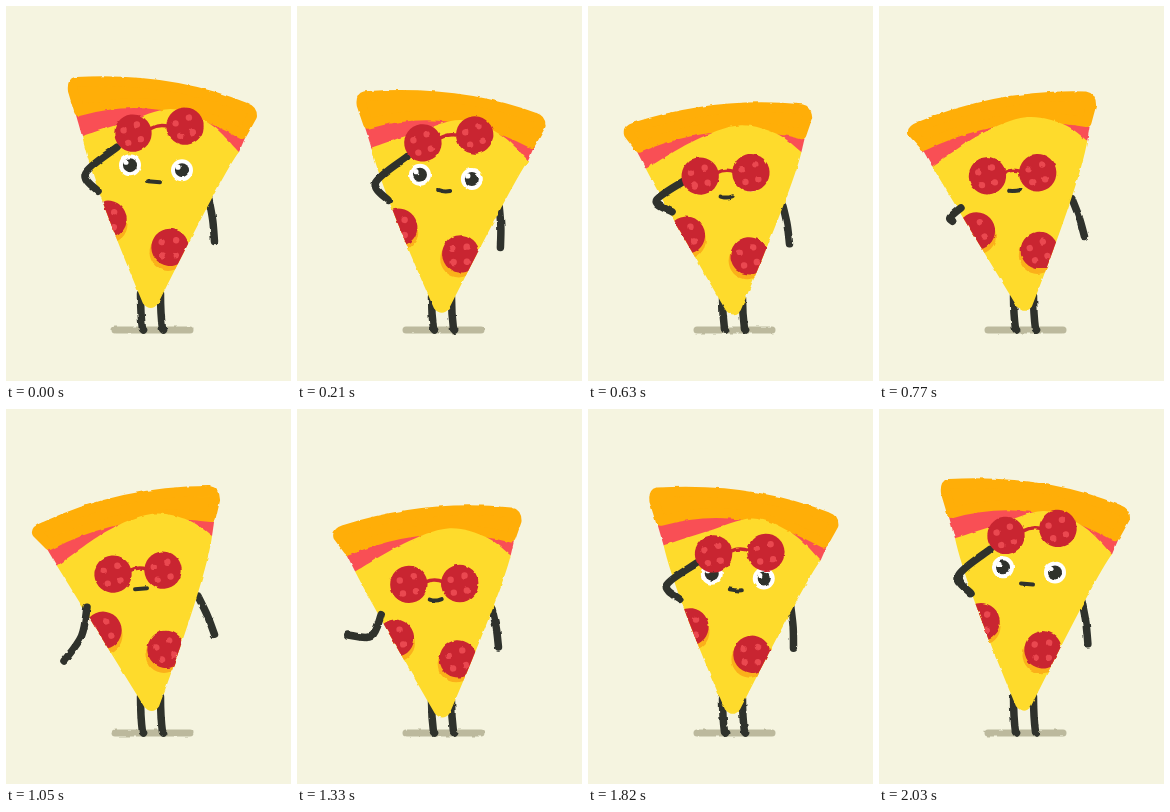
Animation of 285 by 375 pixels, one loop 2.1 s. Source, as an HTML page:

```html
<!DOCTYPE html>
<html lang="en">
<head>
<meta charset="utf-8">
<title>Pizza with sunglasses</title>
<style>
  html, body { margin: 0; width: 100%; height: 100%; overflow: hidden; background: #f5f4e0; }
  svg { display: block; width: 100vw; height: 100vh; }
  .limb { fill: none; stroke: #2f322c; stroke-width: 7.5; stroke-linecap: round; stroke-linejoin: round; }
</style>
</head>
<body>
<svg viewBox="0 0 285 375">
  <defs>
    <filter id="rough" filterUnits="userSpaceOnUse" x="0" y="0" width="285" height="375" color-interpolation-filters="sRGB">
      <feTurbulence id="grain" type="fractalNoise" baseFrequency="0.15" numOctaves="1" result="noise"/>
      <feDisplacementMap in="SourceGraphic" in2="noise" scale="3" xChannelSelector="R" yChannelSelector="G"/>
    </filter>
    <clipPath id="sliceClip"><path id="clipShape"/></clipPath>
    <g id="pepperoni">
      <circle r="18.7" fill="#c92531"/>
      <g fill="#ea4850">
        <circle cx="-9" cy="-4" r="3.2"/><circle cx="5" cy="-8" r="3.2"/>
        <circle cx="7" cy="7" r="3.2"/><circle cx="-6" cy="9" r="3.2"/>
      </g>
    </g>
    <g id="eye">
      <circle r="11" fill="#fff"/><circle r="7" fill="#2f322c"/>
      <circle cx="-4" cy="-3" r="2.6" fill="#fff"/>
    </g>
  </defs>
  <g filter="url(#rough)">
    <path d="M109 324H184" fill="none" stroke="#bcb99d" stroke-width="7" stroke-linecap="round"/>
    <path id="legs" class="limb"/>
    <path id="rightArm" class="limb"/>
    <path id="sauce" fill="#f94f55"/>
    <path id="crust" fill="#ffae08" stroke="#ffae08" stroke-width="10" stroke-linejoin="round"/>
    <path id="cheese" fill="#fedb2c"/>
    <g clip-path="url(#sliceClip)">
      <circle id="leftShade" r="18.5" fill="#fbb01a"/>
      <circle id="rightShade" r="18.5" fill="#fbb01a"/>
      <use id="leftTopping" href="#pepperoni"/>
      <use id="rightTopping" href="#pepperoni"/>
    </g>
    <use id="leftEye" href="#eye"/>
    <use id="rightEye" href="#eye"/>
    <path id="mouth" fill="none" stroke="#2f322c" stroke-width="4" stroke-linecap="round"/>
    <path id="leftArm" class="limb"/>
    <path id="bridge" fill="none" stroke="#c92531" stroke-width="3.5"/>
    <use id="leftLens" href="#pepperoni"/>
    <use id="rightLens" href="#pepperoni"/>
  </g>
</svg>
<script>
const LOOP = 2100, STEP = 70;
const el = id => document.getElementById(id);
const set = (id, d) => el(id).setAttribute('d', d);
const move = (id, [x, y], turn = 0) =>
  el(id).setAttribute('transform', `translate(${x} ${y}) rotate(${turn})`);
const P = p => p.map(v => v.toFixed(2)).join(' ');
const mix = (a, b, k) => a + (b - a) * k;
const blend = (p, q, k) => p.map((v, i) => mix(v, q[i], k));
const shift = ([x, y], dx, dy) => [x + dx, y + dy];
const angle = (a, b) => Math.atan2(b[1] - a[1], b[0] - a[0]) * 180 / Math.PI;

// 0 before start, 1 after end, smooth in between
function ease(t, start, end) {
  const u = Math.min(1, Math.max(0, (t - start) / (end - start)));
  return u * u * (3 - 2 * u);
}

// Rounded line through all points
function curve(points) {
  let d = 'M' + P(points[0]);
  for (let i = 0; i < points.length - 1; i++) {
    const a = points[i - 1] || points[i], b = points[i], c = points[i + 1], e = points[i + 2] || c;
    d += `C${P(b.map((v, k) => v + (c[k] - a[k]) / 6))} ${P(c.map((v, k) => v - (e[k] - b[k]) / 6))} ${P(c)}`;
  }
  return d;
}

// Arc from a to b that passes through m
const through = (a, m, b) => `Q${P(m.map((v, k) => 2 * v - (a[k] + b[k]) / 2))} ${P(b)}`;

function draw(t) {
  const tilt = ease(t, 80, 920) - ease(t, 1030, 1880);
  const bob = 9 - 11 * Math.cos(4 * Math.PI * (t + 70) / LOOP);
  const lift = 1 - ease(t, 440, 700) + ease(t, 1640, 1960);
  const swing = ease(t, 1160, 1590);
  const hold = 1 - ease(t, 600, 920) + swing;

  // Blend the right-leaning and left-leaning pose, then squash towards the feet
  const at = (x0, y0, x1, y1) => {
    const y = mix(y0, y1, tilt);
    return [mix(x0, x1, tilt), y + bob * (.42 + .58 * (303 - y) / 210)];
  };

  drawSlice(at);
  drawFace(at, bob);
  const grip = drawGlasses(at, lift);
  drawLimbs(at, bob, hold, Math.sin(Math.PI * swing), grip);
}

function drawSlice(at) {
  const topL = at(70, 77, 38, 119), topM = at(160, 81, 118, 92), topR = at(240, 103, 203, 83);
  const endR = at(246, 111, 209, 92), lowR = at(236, 129, 205, 109);
  const lowM = at(155, 100, 122, 110), lowL = at(73, 106, 43, 137), endL = at(67, 86, 31, 125);
  set('crust', `M${P(topL)}` + through(topL, topM, topR) + `Q${P(at(246, 105, 209, 84))} ${P(endR)}` +
    `L${P(lowR)}` + through(lowR, lowM, lowL) + `L${P(endL)}Q${P(at(66, 78, 30, 122))} ${P(topL)}Z`);

  const shoulderL = at(76, 131, 51, 158), shoulderR = at(233, 147, 206, 128);
  set('sauce', 'M' + [at(70, 110, 41, 141), topM, at(239, 133, 208, 114), shoulderR, shoulderL].map(P).join('L') + 'Z');

  const edgeL = at(96, 195, 84, 211), edgeR = at(206, 193, 190, 191);
  const tipL = at(137, 298, 138, 298), tip = at(145, 307, 146, 307), tipR = at(152, 298, 153, 298);
  const cheese = curve([shoulderL, at(120, 117, 101, 123), at(165, 104, 145, 106),
    at(204, 119, 182, 112), shoulderR]) + through(shoulderR, edgeR, tipR) +
    `Q${P(tip)} ${P(tipL)}` + through(tipL, edgeL, shoulderL) + 'Z';
  set('cheese', cheese);
  set('clipShape', cheese);

  const toppingL = at(102, 214, 97, 222), toppingR = at(164, 242, 160, 241), lean = angle(topL, topR);
  move('leftTopping', toppingL, lean);
  move('rightTopping', toppingR, lean);
  move('leftShade', shift(toppingL, 1, 5));
  move('rightShade', shift(toppingR, -2, 5));
}

function drawFace(at, bob) {
  move('leftEye', at(124, 160, 108, 167));
  move('rightEye', at(176, 165, 158, 162));
  const left = at(142, 176, 129, 181), right = at(154, 177, 141, 180);
  const middle = shift(blend(left, right, .5), 0, Math.max(0, bob) * .16);
  set('mouth', `M${P(left)}Q${P(middle)} ${P(right)}`);
}

// Returns the place where the hand holds the frame
function drawGlasses(at, lift) {
  const left = shift(at(124, 158, 107, 166), 3 * lift, -30 * lift);
  const right = shift(at(177, 165, 157, 162), 2 * lift, -44 * lift);
  const turn = angle(left, right);
  move('leftLens', left, turn);
  move('rightLens', right, turn);
  const between = (k, up) => shift(blend(left, right, k), 0, -up);
  set('bridge', `M${P(between(.32, 2))}Q${P(between(.5, 6))} ${P(between(.68, 2))}`);
  return shift(left, -16, 13 * lift + 1);
}

function drawLimbs(at, bob, hold, arc, grip) {
  const shoulder = at(92, 186, 81, 199);
  const hand = shift(blend([58, 252], grip, hold), -23 * arc, 0);
  const elbow = shift(blend(shoulder, hand, .5), mix(6, -22, hold) + 12 * arc, mix(2, 4, hold) + 10 * arc);
  set('leftArm', curve([shoulder, elbow, hand]));

  const rightShoulder = at(203, 194, 192, 188);
  const rightHand = shift(at(208, 236, 208, 226), -.45 * bob, 0);
  set('rightArm', curve([rightShoulder, shift(blend(rightShoulder, rightHand, .5), 1, 0), rightHand]));

  const hip = 288 + bob * .3;
  const leg = x => `M${x - 2} ${hip}Q${x - 2} 308 ${x} 323L${x + 1} 324`;
  set('legs', leg(136.5) + leg(156.5));
}

function frame(now) {
  const step = Math.floor((now % LOOP) / STEP);
  if (step !== frame.last) {
    frame.last = step;
    el('grain').setAttribute('seed', step + 1);
    draw(step * STEP);
  }
  requestAnimationFrame(frame);
}
frame(0);
</script>
</body>
</html>
```
